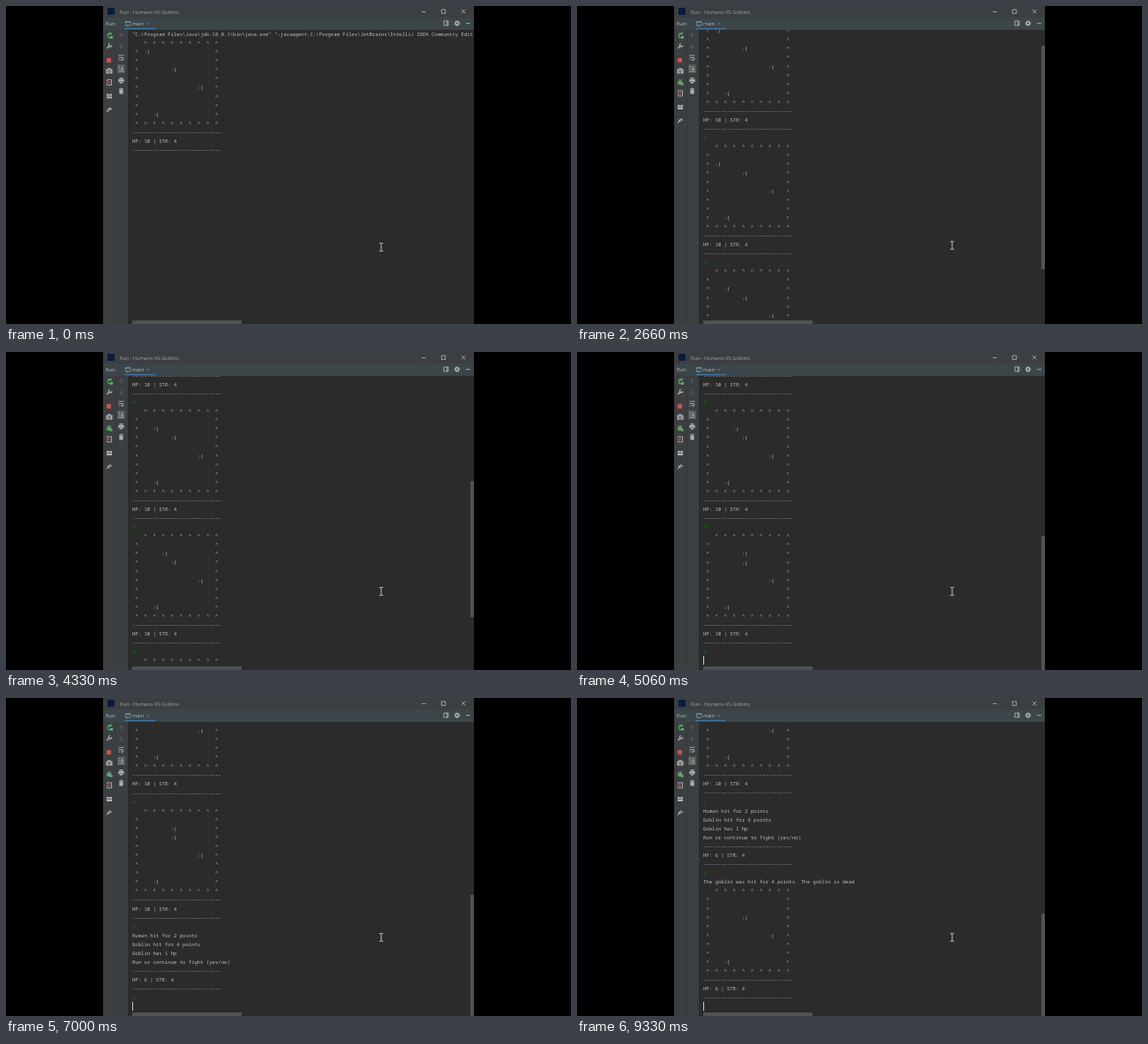
Write an HTML page that moves like this. It is 640 px wide and 360 px high and loops after 9.73 s.

```html
<!DOCTYPE html>
<html lang="en">
<head>
<meta charset="utf-8">
<title>Humans-VS-Goblins</title>
<style>
html, body { margin: 0; width: 100%; height: 100%; overflow: hidden; background: #000; }
#stage { position: relative; width: 640px; height: 360px; overflow: hidden; text-rendering: geometricPrecision; }
svg { position: absolute; left: 0; top: 0; }
svg text { font: 5.62px "Open Sans", "Noto Sans", sans-serif; fill: #bbb; }
#view { position: absolute; left: 138px; top: 27px; width: 392px; height: 333px; overflow: hidden; background: #2b2b2b; }
#log { position: absolute; left: 5px; top: 0; margin: 0; color: #bbb; white-space: pre;
  font: 5.607px/10.08px "Noto Sans Mono", monospace; font-variant-ligatures: none; }
#log i { color: #007f00; }
#log b { display: inline-block; width: 1px; height: 10px; margin-right: -1px; vertical-align: top; background: #ccc; }
.bar { position: absolute; background: #505253; }
#flat { left: 5px; bottom: 0; width: 124px; height: 4px; }
#thumb { right: 0; width: 4.5px; }
</style>
</head>
<body>
<div id="stage">
  <svg width="640" height="360" fill="none" stroke="#afb1b3">
    <g stroke="none">
      <path fill="#3c3f41" d="M110 0h420v27H138v333h-28z"/>
      <path fill="#3b454a" d="M110 13h420v14H110z"/>
      <path fill="#353738" d="M124 27h.6v333h-.6z"/>
      <path fill="#41749f" d="M134 25h35v1.300h-35z"/>
      <path fill="#0b1b3f" d="M115 2h8v8h-8z"/>
      <path fill="#55585a" d="M126 66h9v10h-9z"/>
      <text x="129" y="8.600" style="fill:#a0a2a4">Run - Humans-VS-Goblins</text>
      <text x="113" y="21.800">Run:</text>
      <text x="143" y="21.800">main</text>
    </g>
    <!-- window buttons, tab row -->
    <path stroke="#c8c8c8" stroke-width=".7" d="M471 6.500h4.500M493.300 4h4.400v4.400h-4.400zM516 4l4.400 4.400m0-4.400L516 8.400"/>
    <path stroke="#8a8c8e" stroke-width=".6" d="M159.300 18.800l2.400 2.400m0-2.400l-2.400 2.400"/>
    <path stroke="#7f9aa3" stroke-width=".7" d="M135.500 17.500h5.500v4.500h-5.500zM135.500 18.500h5.500"/>
    <path stroke="#59a869" d="M136 22.500h3"/>
    <path stroke-width=".9" d="M496 17h5v5h-5zM499.500 17v5M521 19.700h5"/>
    <circle cx="511" cy="19.600" r="1.800" stroke-width="1.500"/>
    <circle cx="511" cy="19.600" r="2.900" stroke-width=".9" stroke-dasharray="1.140"/>
    <!-- output tools -->
    <path stroke="#606366" stroke-width=".8" d="M130.500 36v-5m-2 2l2-2 2 2M130.500 43v5m-2-2l2 2 2-2"/>
    <path stroke-width=".9" d="M127.500 56h6M127.500 58.500h5q1.500 1.300 0 2.500h-2m1-1.200l-1 1.200 1 1.200M127.500 61h1.500"/>
    <path stroke-width=".9" d="M127.500 68.500h2M127.500 71h2M127.500 74h6M131.700 68v4.500m-1.500-1.500l1.500 1.500 1.500-1.500"/>
    <path stroke="none" fill="#afb1b3" d="M128.500 81h4v1.500h-4zM127.300 83h6.400v3h-1.200v-1h-4v1h-1.200zM128.800 85.500h3.400v2h-3.400zM128 93.500h5v1h-5zM129.500 92.700h2v.8h-2zM128.400 95h4.200v4.500h-4.200z"/>
    <!-- run tools -->
    <path stroke="#59a869" stroke-width="1.200" d="M119 35.500a2.500 2.500 0 1 1 0-4.200m0-1.500v2.200h-2.300"/>
    <path stroke="none" fill="#59a869" d="M118 34h3v3h-3z"/>
    <path stroke-width="1.500" d="M114.300 48l3.200-3.200"/>
    <path stroke-width="1.200" d="M118 42.500a1.800 1.800 0 1 0 1.900 1.900"/>
    <path stroke="none" fill="#c75450" d="M114 59h5v5h-5z"/>
    <path stroke="none" fill="#afb1b3" d="M113.500 71.500h1.500l.8-1.200h2.400l.8 1.200h1.500v5h-7z"/>
    <circle cx="117" cy="73.900" r="1.400" stroke="#3c3f41" stroke-width=".8"/>
    <g id="bug">
      <path stroke-width=".8" d="M113.800 85l1.500.7M113.800 88l1.500-.5M115.500 83l1 1.200M118.500 83l-1 1.200"/>
      <circle cx="117" cy="86.700" r="2.500" fill="#59a869" stroke="none"/>
      <path stroke="none" fill="#59a869" d="M118 87h2.500v2.700H118z"/>
    </g>
    <g id="lower">
      <path stroke-width=".9" d="M114.500 85v-1.500h5v6h-5V88"/>
      <path stroke="#c75450" d="M113.500 86.500h4m-1.300-1.300l1.300 1.300-1.300 1.300"/>
      <path stroke="none" fill="#afb1b3" d="M114 99.500h2.700v2.300H114zM117.300 99.500h2.700v2.300h-2.700zM114 102.400h6v2.200h-6z"/>
      <path stroke-width="1.100" d="M117.500 115l2.300 2.300M118.500 115.500l-2 1.800M115 116.200l2.500 2.500M116 118l-2 2"/>
    </g>
  </svg>
  <div id="view">
    <pre id="log"></pre>
    <div class="bar" id="flat"></div>
    <div class="bar" id="thumb"></div>
  </div>
  <svg width="640" height="360" fill="none" stroke="#c4c4c4">
    <path id="mouse" d="M422.800-4.500h1.500l.7.700.7-.7h1.500M425-4v8M422.800 4.500h1.500l.7-.7.7.7h1.500"/>
  </svg>
</div>
<script>
const LOOP = 9730, LINE = 10.08, VIEW = 333, BLINK = 515, GLIDE = 200;
const $ = id => document.getElementById(id);
const goblins = [[4, 3], [7, 5], [2, 8]];

function cell(c, r, x, y) {
  if (c + r === 0) return '   ';
  if (c % 9 === 0 || r % 9 === 0) return ' ^ ';
  if (c === x && r === y) return ' :)';
  return goblins.some(g => g[0] === c && g[1] === r) ? ' :{' : '   ';
}
const range = [...Array(10).keys()];
const field = (x, y) => range.map(r => range.map(c => cell(c, r, x, y)).join('') + '\n').join('');
const rule = '-'.repeat(30) + '\n';
const status = hp => `${rule}HP: ${hp} | STR: 4\n${rule}`;
const turn = (x, y, hp = 10) => field(x, y) + status(hp);
const key = k => `<i>${k}</i>`;

const command = String.raw`"C:\Program Files\Java\jdk-18.0.1\bin\java.exe" "-javaagent:C:\Program Files\JetBrains\IntelliJ IDEA Community Edition`;
const fight = 'Human hit for 2 points\nGoblin hit for 4 points\nGoblin has 1 hp\nRun or continue to fight (yes/no)\n';
const kill = 'The goblin was hit for 4 points. The goblin is dead\n';

// What is added to the console and when; each entry restarts the caret blink.
const events = [
  [-900, command + '\n' + turn(1, 1)],
  [1260, key('s')], [1530, '\n'], [1735, turn(1, 2)],
  [2260, key('d')], [2400, '\n'], [2605, turn(2, 2)],
  [3200, key('d')], [3260, '\n'], [3330, turn(3, 2)],
  [4000, key('d')], [4200, '\n'], [4330, turn(4, 2)],
  [4800, key('s')], [5060, '\n'], [5200, fight + status(6)],
  [6660, key('y')], [7000, '\n'], [7060, kill + turn(4, 3, 6)],
  [7260, '']
];

let text = '';
const states = events.map(([time, added]) => {
  text += added;
  const lines = text.split('\n').length - 1;
  return { time, text, lines, end: Math.max(0, (lines - 31.5) * LINE) };
});

let shown = '';
function draw(now) {
  // The screen refreshes 15 times a second.
  const t = Math.floor((now % LOOP + 7) * .015) / .015;
  const i = states.findLastIndex(s => s.time <= t);
  const s = states[i], prev = states[i - 1] || s;

  const p = s.lines - prev.lines > 1 ? Math.min(1, (t - s.time) / GLIDE) : 1;
  const scroll = prev.end + (s.end - prev.end) * p * p * (3 - 2 * p);
  const caret = (t - s.time) % (2 * BLINK) < BLINK;
  const html = s.text + `<b style="opacity:${+caret}"></b>`;
  if (html !== shown) $('log').innerHTML = shown = html;
  $('log').style.top = -scroll + 'px';

  const ratio = VIEW / (VIEW + s.end), bar = $('thumb').style;
  bar.display = s.end ? 'block' : 'none';
  bar.top = scroll * ratio + 'px';
  bar.height = VIEW * ratio + 'px';

  const running = t >= 400;
  $('bug').style.display = running ? '' : 'none';
  $('lower').setAttribute('transform', `translate(0 ${running ? 12.4 : 0})`);
  $('mouse').setAttribute('transform', `translate(0 ${t < 200 ? 273 : 271})`);
}

const start = performance.now();
(function frame() {
  draw(performance.now() - start);
  requestAnimationFrame(frame);
})();
</script>
</body>
</html>
```
